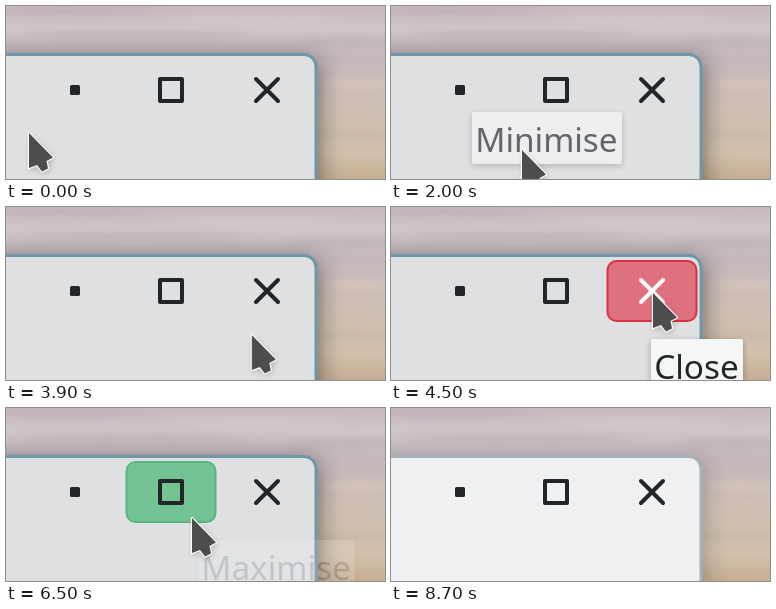
An HTML page for the animation above (8.8 s loop, 379 by 173 pixels).

```html
<!DOCTYPE html>
<html lang="en">
<head>
<meta charset="utf-8">
<title>Window buttons</title>
<style>
html, body { margin: 0; width: 100%; height: 100%; overflow: hidden; }
svg { display: block; width: 100vw; height: 100vh; }
text { font: 33.3px "Noto Sans", sans-serif; fill: #232629; }
</style>
</head>
<body>
<svg viewBox="0 0 379 173">
  <defs>
    <linearGradient id="sky" x1="0" y1="0" x2="0" y2="1">
      <stop offset="0" stop-color="#c6b9c0"/>
      <stop offset=".13" stop-color="#cfc5ca"/>
      <stop offset=".3" stop-color="#c3b7bc"/>
      <stop offset=".55" stop-color="#cfbfb5"/>
      <stop offset=".85" stop-color="#d2c0ab"/>
      <stop offset="1" stop-color="#c5ae92"/>
    </linearGradient>
    <filter id="soft" x="-50%" y="-200%" width="200%" height="500%"><feGaussianBlur stdDeviation="9 3"/></filter>
    <filter id="shade" x="-20%" y="-40%" width="140%" height="180%"><feGaussianBlur stdDeviation="12"/></filter>
    <filter id="tipShade" x="-20%" y="-40%" width="140%" height="200%"><feGaussianBlur stdDeviation="3"/></filter>
  </defs>

  <rect width="379" height="173" fill="url(#sky)"/>
  <g filter="url(#soft)">
    <ellipse cx="60" cy="5" rx="90" ry="4" fill="#b9aab4" opacity=".6"/>
    <ellipse cx="250" cy="14" rx="90" ry="4" fill="#d6ccd0" opacity=".6"/>
    <ellipse cx="130" cy="29" rx="110" ry="4" fill="#b8abb1" opacity=".5"/>
    <ellipse cx="345" cy="36" rx="50" ry="5" fill="#b9adae" opacity=".6"/>
    <ellipse cx="355" cy="78" rx="40" ry="5" fill="#d8c9bd" opacity=".7"/>
    <ellipse cx="350" cy="128" rx="45" ry="4" fill="#c3b2a2" opacity=".5"/>
  </g>
  <rect id="shadow" x="-60" y="52" width="372" height="190" rx="12" fill="#1c1a1e" filter="url(#shade)"/>

  <rect id="frame" x="-20" y="48.5" width="330" height="160" rx="12" stroke-width="3"/>

  <g id="hovers" stroke-width="2">
    <rect x="24.5" y="54" width="89" height="60" rx="9" fill="#eca15e" stroke="#f19132"/>
    <rect x="120.5" y="54" width="89" height="60" rx="9" fill="#73c394" stroke="#59b683"/>
    <rect x="216.5" y="54" width="89" height="60" rx="9" fill="#df717e" stroke="#da2f42"/>
  </g>
  <rect x="64" y="79" width="10" height="10" rx="1.5" fill="#232629"/>
  <rect x="154" y="73" width="22" height="22" fill="none" stroke="#232629" stroke-width="4" stroke-linejoin="round"/>
  <path id="cross" d="M250 73l22 22m0-22l-22 22" fill="none" stroke-width="4" stroke-linecap="round"/>

  <g id="tips"></g>
  <g id="cursor">
    <path d="M0 0V35L8 32L13 38.5L19 35.5L17.5 28L24 24.5Z" transform="translate(1 2)" fill="#000" opacity=".25" filter="url(#tipShade)"/>
    <path d="M0 0V35L8 32L13 38.5L19 35.5L17.5 28L24 24.5Z" fill="#4d4d4d" stroke="#fcfcfc" stroke-width="2.4" stroke-linejoin="round" paint-order="stroke"/>
  </g>
</svg>
<script>
const LOOP = 8800, STEP = 100;
const $ = id => document.getElementById(id);

// time, x, y of the pointer tip
const path = [
  [0, 23, 127], [200, 23, 127], [700, 83, 60], [1500, 83, 60],
  [2000, 131, 144], [2400, 173, 80], [3100, 173, 80], [3400, 191, 119],
  [3750, 236, 138], [4400, 262, 86], [5000, 262, 86], [5450, 233, 138],
  [5900, 194, 86], [6200, 194, 86], [6500, 186, 110], [7100, 176, 108],
  [7700, -32, 150], [LOOP, -32, 150]
];

// fade in start, end, fade out start, end
const hovers = [
  [[300, 600, 1700, 1950]],
  [[2100, 2400, 3300, 3630], [5550, 5850, 7100, 7400]],
  [[4050, 4350, 5150, 5450]]
];
const tips = [
  { label: "Minimise", x: 81, y: 106, w: 150, span: [1100, 1400, 1800, 2380] },
  { label: "Maximise", x: 171, y: 126, w: 157, span: [2700, 2800, 3450, 3900] },
  { label: "Close", x: 260, y: 132, w: 92, span: [4200, 4500, 5250, 5750] },
  { label: "Maximise", x: 192, y: 132, w: 157, span: [5600, 5850, 6200, 6550] }
];

$("tips").innerHTML = tips.map(({ label, x, y, w }) => `
  <g transform="translate(${x} ${y})">
    <rect y="2" width="${w}" height="52" rx="3" fill="#000" opacity=".3" filter="url(#tipShade)"/>
    <rect width="${w}" height="52" rx="2" fill="#f5f6f6"/>
    <text x="3.2" y="40">${label}</text>
  </g>`).join("");

const ramp = (t, a, b) => Math.min(1, Math.max(0, (t - a) / (b - a)));
const fade = (t, [a, b, c, d]) => ramp(t, a, b) * (1 - ramp(t, c, d));
const mix = (a, b, k) => `rgb(${a.map((v, i) => Math.round(v + (b[i] - v) * k))})`;

// slope at a key: zero where the pointer rests
function slope(i, axis) {
  const a = path[i - 1], k = path[i], b = path[i + 1];
  if (!a || !b) return 0;
  const rests = p => p[1] === k[1] && p[2] === k[2];
  return rests(a) || rests(b) ? 0 : (b[axis] - a[axis]) / (b[0] - a[0]);
}

function pointer(t, axis) {
  let i = 0;
  while (i < path.length - 2 && t >= path[i + 1][0]) i++;
  const a = path[i], b = path[i + 1], d = b[0] - a[0], u = (t - a[0]) / d, v = 1 - u;
  return a[axis] * (1 + 2 * u) * v * v + b[axis] * u * u * (3 - 2 * u)
    + d * u * v * (slope(i, axis) * v - slope(i + 1, axis) * u);
}

function draw(t) {
  const idle = ramp(t, 8500, 8700);
  $("shadow").setAttribute("opacity", 0.55 - 0.25 * idle);
  $("frame").setAttribute("fill", mix([222, 224, 226], [239, 240, 242], idle));
  $("frame").setAttribute("stroke", mix([110, 151, 171], [166, 176, 184], idle));

  const glow = hovers.map(spans => Math.max(...spans.map(s => fade(t, s))));
  glow.forEach((g, i) => $("hovers").children[i].setAttribute("opacity", g));
  $("cross").setAttribute("stroke", mix([35, 38, 41], [252, 252, 252], glow[2]));

  tips.forEach((tip, i) => $("tips").children[i].setAttribute("opacity", fade(t, tip.span)));
  $("cursor").setAttribute("transform", `translate(${pointer(t, 1)} ${pointer(t, 2)})`);
}

const start = performance.now();
function tick() {
  const t = (performance.now() - start) % LOOP;
  draw(Math.floor(t / STEP) * STEP);
  requestAnimationFrame(tick);
}
tick();
</script>
</body>
</html>
```
